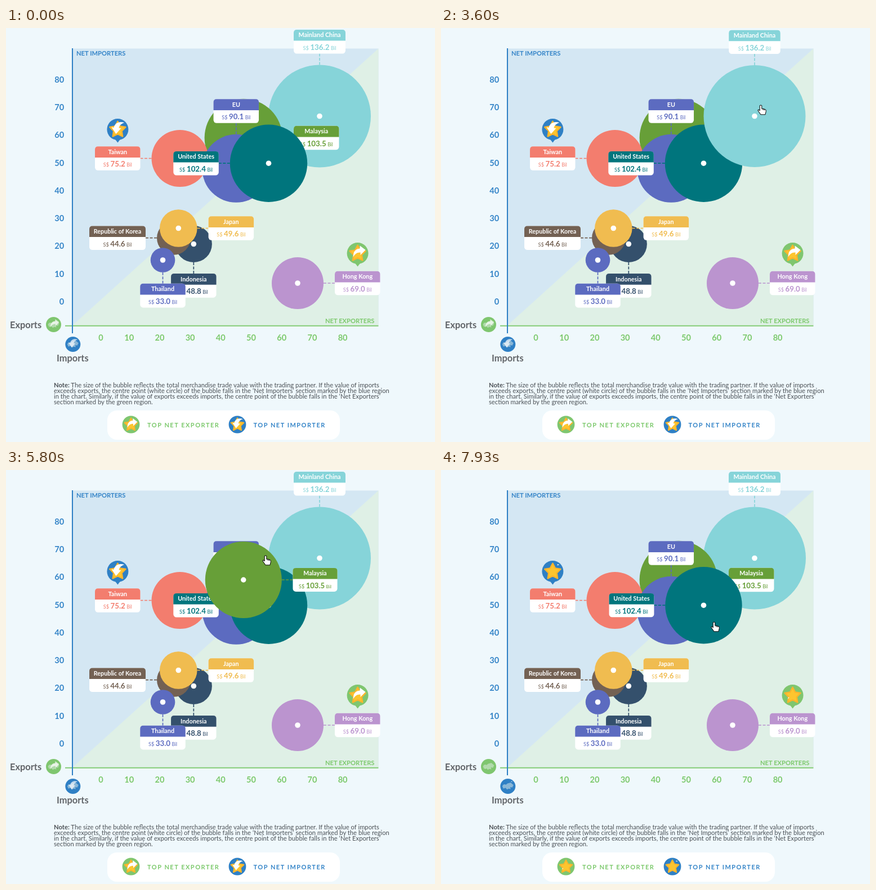
Recreate the animation shown at these times as an HTML page. Size 762 by 735 pixels, loop 8 s.

```html
<!DOCTYPE html>
<html lang="en">
<head>
<meta charset="utf-8">
<title>Trading partners bubble chart</title>
<style>
  html, body { margin: 0; width: 100%; height: 100%; overflow: hidden; background: #eff8fc; }
  svg { display: block; width: 762px; height: 735px; font-family: Lato, "Open Sans", sans-serif; }
  .bold { font-weight: 700; }
  .mid { text-anchor: middle; }
  .end { text-anchor: end; }
  .note { font-size: 11.22px; fill: #4b5055; }
  .legend { font-size: 11px; letter-spacing: 1.5px; }
</style>
</head>
<body>
<svg id="stage" viewBox="0 0 762 735" xmlns="http://www.w3.org/2000/svg">
  <defs>
    <clipPath id="exportClip"><circle id="exportWipe" cx="-8" cy="7"/></clipPath>
    <clipPath id="importClip"><circle id="importWipe" cx="12" cy="-12"/></clipPath>
  </defs>
  <path d="M118 36.5H661.5V528H118Z" fill="#d4e7f3"/>
  <path d="M661.5 36.5V528H118Z" fill="#dff0e6"/>
  <path d="M105 528.7H661.5" stroke="#84cc76" stroke-width="2"/>
  <path d="M118 36V542" stroke="#2f80c5" stroke-width="2"/>
  <g class="bold" font-size="11.2">
    <text x="125" y="48.5" fill="#3585c8">NET IMPORTERS</text>
    <text x="654.5" y="524" class="end" fill="#7cc96c">NET EXPORTERS</text>
  </g>
  <g class="bold" font-size="16.4" fill="#626569">
    <text x="7" y="532.5">Exports</text>
    <text x="90" y="592">Imports</text>
  </g>
  <g id="ticks" class="bold" font-size="14.6"></g>
  <g class="note">
    <text x="85" y="638"><tspan class="bold">Note:</tspan> The size of the bubble reflects the total merchandise trade value with the trading partner. If the value of imports</text>
    <text x="85" y="648">exceeds exports, the centre point (white circle) of the bubble falls in the ‘Net Importers’ section marked by the blue region</text>
    <text x="85" y="658">in the chart. Similarly, if the value of exports exceeds imports, the centre point of the bubble falls in the ‘Net Exporters’</text>
    <text x="85" y="668">section marked by the green region.</text>
  </g>
  <rect x="180" y="679" width="413" height="52" rx="17" fill="#fff"/>
  <g class="bold legend">
    <text x="251" y="709" fill="#7cc96c">TOP NET EXPORTER</text>
    <text x="439.5" y="709" fill="#3585c8">TOP NET IMPORTER</text>
  </g>
  <g id="bubbles"></g>
  <g id="icons"></g>
  <g id="cursor" fill="#fff" stroke="#111" stroke-width="1.2" stroke-linejoin="round">
    <path id="arrow" d="M0 0V15L3.5 12 6 17.5 8.5 16.5 6 11H10.5Z"/>
    <path id="hand" transform="scale(.88)" d="M-2 1Q0 -1 2 1V7L4.5 7.2 7 8 9.5 9Q11 10 10.5 13L9 19H0L-5 12Q-6.5 9.5 -4.5 9L-2 11ZM4.5 7.2V10M7 8V10.5"/>
  </g>
</svg>
<script>
const $ = id => document.getElementById(id);
const LOOP = 8000, LABEL_H = 42.6, HEADER_H = 19.7, GAP = 20;

// name, value, colour, centre x, centre y, radius, label side, label width
const partners = [
  ["Mainland China", "136.2", "#86d4d9", 557, 156.5, 91, "top", 92],
  ["Malaysia", "103.5", "#679f38", 421.8, 195, 69.2, "right"],
  ["Taiwan", "75.2", "#f37d6e", 309, 231.5, 50.5, "left"],
  ["EU", "90.1", "#5c6bc0", 408.8, 249.3, 60.5, "top"],
  ["United States", "102.4", "#00757d", 466.5, 240.2, 68.7, "left"],
  ["Indonesia", "48.8", "#34506c", 333.3, 383.5, 32.6, "bottom"],
  ["Republic of Korea", "44.6", "#736153", 298, 372.7, 30, "left", 100],
  ["Japan", "49.6", "#f0bc50", 306.3, 355.5, 33.3, "right"],
  ["Thailand", "33.0", "#5c6bc0", 278.5, 412, 21.8, "bottom"],
  ["Hong Kong", "69.0", "#bb94cf", 518, 453, 46, "right"]
];
const sides = { left: [-1, 0], right: [1, 0], top: [0, -1], bottom: [0, 1] };

function bubble([name, value, color, cx, cy, r, side, w = 80.5]) {
  const [sx, sy] = sides[side], reach = r + GAP;
  const x = sx * (reach + w / 2), y = sy * (reach + LABEL_H / 2) - LABEL_H / 2;
  const g = document.createElementNS("http://www.w3.org/2000/svg", "g");
  g.innerHTML = `
    <path d="M${sx * r} ${sy * r}L${sx * reach} ${sy * reach}" stroke="${color}" stroke-width="1.7" stroke-dasharray="5 2.5"/>
    <circle r="${r}" fill="${color}"/>
    <circle r="4.8" fill="#fff"/>
    <g transform="translate(${x} ${y})">
      <rect x="${-w / 2}" width="${w}" height="${LABEL_H}" rx="5.5" fill="#fff"/>
      <path d="M${-w / 2} ${HEADER_H}V5.5q0 -5.5 5.5 -5.5H${w / 2 - 5.5}q5.5 0 5.5 5.5V${HEADER_H}Z" fill="${color}"/>
      <text class="bold mid" y="13.5" font-size="10.8" fill="#fff">${name}</text>
      <text class="mid" y="36.2" font-size="9.2" fill="${color}">S$<tspan class="bold" dx="2.5" font-size="13.3">${value}</tspan><tspan dx="2.5" font-size="8.6">Bil</tspan></text>
    </g>`;
  g.place = s => g.setAttribute("transform", `translate(${cx} ${cy}) scale(${s})`);
  return g;
}
const bubbles = partners.map(bubble);

const green = "#7fc66f", blue = "#2f80c5";
const tick = (x, y, cls, color, n) => `<text x="${x}" y="${y}" class="${cls}" fill="${color}">${n}</text>`;
for (let n = 0; n <= 80; n += 10) {
  $("ticks").innerHTML +=
    tick(103.3, 491 - 4.93 * n, "end", "#3585c8", n) +
    tick(n ? 164.5 + 5.42 * n : 168.5, 555, "mid", "#7cc96c", n);
}

const starPoints = Array.from({ length: 10 }, (_, i) => {
  const a = i * Math.PI / 5 - Math.PI / 2, r = i % 2 ? 7.6 : 14.8;
  return `${(r * Math.cos(a)).toFixed(2)},${(r * Math.sin(a)).toFixed(2)}`;
}).join(" ");
const star = `<polygon points="${starPoints}" transform="translate(0 .5)" fill="#fdc52f" stroke="#fbb52c" stroke-width="2.4" stroke-linejoin="round"/>`;
const map = `<path d="M-14 0Q-11 -7 -5 -4L-1 -7 7 -9 14 -3 11 3 6 2 7 7 2 6 -2 8 -6 4 -11 6Z" fill="#e4eee9" opacity=".5"/>`;
const tail = `<path d="M-5 17L0 23.5 5 17Z"/>`;
const arrows = {
  export: "M-8 7C-8 -3 -4 -8 4 -8.5V-13.5L14 -6 5 3V-1.5C-1 -2 -5 1 -8 7Z",
  import: "M12 -12C3 -15 -5 -12 -7 -3L-11 -4 -3 8 6 -2 2 -2.5C3 -7 6 -10 12 -12Z"
};
function icon(kind, x, y, scale, body, pin = "", opacity = 1) {
  return `<g transform="translate(${x} ${y}) scale(${scale})">
    <g fill="${kind === "export" ? green : blue}">${pin}<circle r="19"/></g>${body}
    <path d="${arrows[kind]}" fill="#fff" opacity="${opacity}" clip-path="url(#${kind}Clip)"/></g>`;
}
$("icons").innerHTML =
  icon("import", 198.4, 180, 1, star, tail) +
  icon("export", 624.6, 400, 1, star, tail) +
  icon("export", 84.5, 526.5, .71, map, "", .7) +
  icon("import", 118.8, 561.5, .71, map, "", .7) +
  icon("export", 222, 704, .81, star) +
  icon("import", 411, 704, .81, star);

// Each hover: start, end, bubble index
const hovers = [[2615, 4924, 0], [4924, 7416, 1], [7416, LOOP, 4]];
const PULSE = 480;
let raised;

function drawBubbles(t) {
  const hover = hovers.find(([a, b]) => t >= a && t < b);
  const top = hover ? hover[2] : -1;
  if (top !== raised) {
    $("bubbles").append(...bubbles);
    if (hover) $("bubbles").append(bubbles[top]);
    raised = top;
  }
  bubbles.forEach((b, i) => {
    if (i !== top) return b.place(1);
    const phase = (t - hover[0]) % PULSE / PULSE;
    b.place(.95 + .05 * Math.abs(1 - 2 * phase));
  });
}

function drawArrows(t) {
  const phase = (t - 385 + 938) % 938;
  const r = 3 + 28 * Math.min(1, phase / 450) ** 1.5;
  $("exportWipe").setAttribute("r", r);
  $("importWipe").setAttribute("r", r);
}

// time, x, y of the pointer tip
const track = [
  [2300, 705, 112], [2615, 646, 126], [2870, 614, 131], [3200, 568, 137],
  [4450, 568, 137], [5000, 461, 152], [7000, 461, 152], [7700, 485, 270], [LOOP, 485, 270]
];
function drawCursor(t) {
  const shown = t >= track[0][0];
  $("cursor").setAttribute("visibility", shown ? "visible" : "hidden");
  if (!shown) return;
  const i = track.findIndex(p => t < p[0]);
  const [t0, x0, y0] = track[i - 1], [t1, x1, y1] = track[i];
  const u = (t - t0) / (t1 - t0), k = t0 < 3200 ? u : u * u * (3 - 2 * u);
  $("cursor").setAttribute("transform", `translate(${x0 + (x1 - x0) * k} ${y0 + (y1 - y0) * k})`);
  const inside = t >= hovers[0][0];
  $("hand").style.display = inside ? "" : "none";
  $("arrow").style.display = inside ? "none" : "";
}

const start = performance.now();
function frame() {
  const t = (performance.now() - start) % LOOP;
  drawBubbles(t);
  drawArrows(t);
  drawCursor(t);
  requestAnimationFrame(frame);
}
frame();
</script>
</body>
</html>
```
